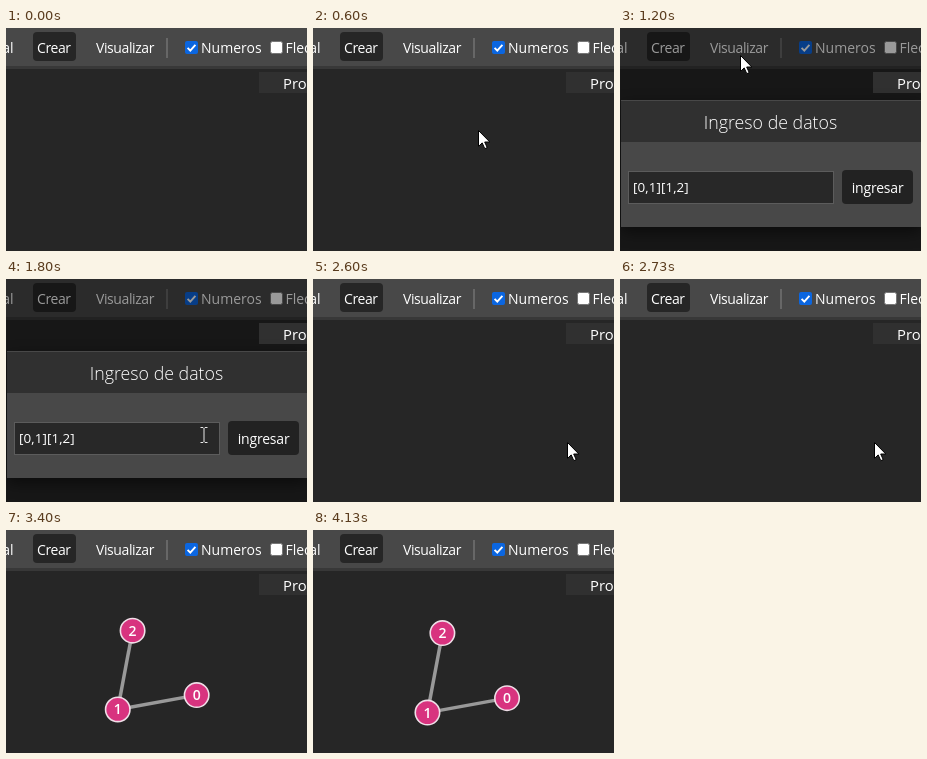
An HTML page for the animation above (4190 ms loop, 301 px wide and 223 px high).

```html
<!DOCTYPE html>
<html lang="es">
<head>
<meta charset="utf-8">
<title>Editor de grafos</title>
<style>
  html, body { margin: 0; width: 100%; height: 100%; overflow: hidden; background: #262626; }
  svg { display: block; width: 100%; height: 100%; }
  text { font: 14px "Open Sans", "Noto Sans", sans-serif; fill: #fff; }
  .btn { fill: #262626; }
  .tight { letter-spacing: -.4px; }
  .mid { text-anchor: middle; }
  .title { font-size: 17.8px; font-weight: 300; }
  .tab { font-size: 14.8px; }
  .field { font-size: 13.4px; letter-spacing: .1px; }
  #edges line { stroke: #999; stroke-width: 3.5; }
  #nodes circle { fill: #d8337f; stroke: #f0dfe8; stroke-width: 1.6; }
  #nodes text { font-weight: 600; }
</style>
</head>
<body>
<svg viewBox="0 0 301 223" preserveAspectRatio="none">
  <defs>
    <filter id="blur" x="-20%" y="-30%" width="140%" height="160%"><feGaussianBlur stdDeviation="7.5"/></filter>
  </defs>
  <rect width="301" height="223" fill="#262626"/>

  <g id="graph"><g id="edges"></g><g id="nodes"></g></g>

  <rect width="301" height="38" fill="#484848"/>
  <rect y="38" width="301" height="3" fill="#383838"/>
  <text x="7.5" y="25" text-anchor="end">Manual</text>
  <rect class="btn" x="27" y="4" width="43" height="29" rx="4"/>
  <text class="tight" x="31" y="25">Crear</text>
  <rect class="btn" id="hover" x="86" y="4" width="66" height="29" rx="4"/>
  <text class="tight" x="90" y="25">Visualizar</text>
  <rect x="160" y="10" width="2" height="20" fill="#676767"/>
  <rect x="179" y="13" width="13" height="13" rx="2" fill="#0b66e0"/>
  <path d="M181.6 19.8l2.7 2.8 5.1-5.7" fill="none" stroke="#fff" stroke-width="1.9"/>
  <text x="195" y="25">Numeros</text>
  <rect x="264.5" y="13.5" width="12" height="12" rx="2" fill="#fff" stroke="#767676"/>
  <text x="279.5" y="25">Flechas</text>

  <rect id="shade" width="301" height="223" fill="#000" opacity=".4"/>
  <rect x="253" y="44" width="48" height="21" fill="#303030"/>
  <text class="tab" x="277" y="61">Propiedades</text>

  <g id="dialog">
    <rect x="1" y="77" width="300" height="127" fill="#000" opacity=".5" filter="url(#blur)"/>
    <rect x="1" y="72" width="300" height="127" fill="#484848"/>
    <rect x="1" y="73" width="300" height="41" fill="#303030"/>
    <text class="mid title" x="150.5" y="101">Ingreso de datos</text>
    <rect x="8.5" y="143.5" width="205" height="32" fill="#282828" stroke="#5c5c5c"/>
    <text class="field" x="13" y="164">[0,1][1,2]</text>
    <rect x="222" y="142" width="71" height="34" rx="4" fill="#222"/>
    <text class="mid" x="257.6" y="165" letter-spacing="-.2">ingresar</text>
  </g>

  <g id="arrow">
    <path d="M.5 .5V16.4L4.2 12.9 6.8 18.7 9.2 17.6 6.7 12H11.8Z" fill="#fff" stroke="#000" stroke-width="1"/>
  </g>
  <g id="beam" fill="none">
    <path d="M-3.5 -7.5H-1L0 -6.5 1 -7.5H3.5M0 -6.5V6.5M-3.5 7.5H-1L0 6.5 1 7.5H3.5" stroke="#e8e8e8"/>
  </g>
</svg>
<script>
  const LOOP = 4190, STEP = 200 / 3;
  const OPEN = 18, CLOSE = 39, GRAPH = 42;
  const $ = id => document.getElementById(id);

  // Pointer stops: step, x, y
  const stops = [
    [4, 255, 211], [5, 248, 198], [7, 214, 156], [9, 165, 102], [11, 127, 57],
    [12, 121, 38], [13, 120, 27], [21, 120, 27],
    [22, 123, 34], [23, 134, 56], [25, 168, 113], [26, 184, 138], [27, 198, 156],
    [28, 208, 163], [29, 217, 167], [30, 228, 173], [31, 240, 175], [32, 250, 170],
    [33, 254, 163], [41, 254, 163], [43, 290, 169]
  ];

  // Offsets of the nodes 0, 1, 2 from their centre
  const shape = [[48.2, 16.9], [-31.6, 31.4], [-16.6, -48.3]];
  const links = [[0, 1], [1, 2]];

  function add(parent, tag, attrs = {}) {
    const el = document.createElementNS("http://www.w3.org/2000/svg", tag);
    set(el, attrs);
    return parent.appendChild(el);
  }
  function set(el, attrs) {
    for (const k in attrs) el.setAttribute(k, attrs[k]);
  }
  function show(el, on) {
    el.style.display = on ? "" : "none";
  }

  const lines = links.map(() => add($("edges"), "line"));
  const balls = shape.map((_, i) => {
    const g = add($("nodes"), "g");
    add(g, "circle", { r: 12.2 });
    add(g, "text", { class: "mid", y: 5 }).textContent = i;
    return g;
  });

  function pointer(n) {
    const last = stops.length - 1;
    if (n < stops[0][0] || n > stops[last][0]) return null;
    const i = Math.min(last - 1, stops.findLastIndex(s => s[0] <= n));
    const [a, ax, ay] = stops[i], [b, bx, by] = stops[i + 1];
    const k = (n - a) / (b - a);
    return [ax + (bx - ax) * k, ay + (by - ay) * k];
  }

  // The graph spreads out while it settles towards its resting centre
  function layout(n) {
    const u = n * STEP - 3000;
    const slow = Math.exp(-u / 500);
    const gap = 19.6 * Math.exp(-u / 130) + 6 * slow;
    const size = (1 - 0.025 * slow) * (1 - Math.exp(-(u + 260) / 60));
    const cx = 146.6 - gap, cy = 151.9 - gap * 0.97;
    return shape.map(([x, y]) => [cx + x * size, cy + y * size]);
  }

  function draw(t) {
    const n = Math.floor((t + 3.4) / STEP);
    const open = n >= OPEN && n < CLOSE;
    const p = pointer(n);
    const inField = open && p && p[0] > 8 && p[0] < 214 && p[1] > 143 && p[1] < 176;

    show($("shade"), open);
    show($("dialog"), open);
    show($("hover"), !open && p && p[1] < 39 && p[0] > 86 && p[0] < 152);
    show($("arrow"), p && !inField);
    show($("beam"), inField);
    if (p) {
      const move = { transform: `translate(${Math.round(p[0])} ${Math.round(p[1])})` };
      set($("arrow"), move);
      set($("beam"), move);
    }

    show($("graph"), n >= GRAPH);
    if (n < GRAPH) return;
    const pts = layout(n);
    balls.forEach((b, i) => set(b, { transform: `translate(${pts[i]})` }));
    lines.forEach((l, i) => {
      const [a, b] = links[i].map(k => pts[k]);
      set(l, { x1: a[0], y1: a[1], x2: b[0], y2: b[1] });
    });
  }

  const start = performance.now();
  function tick() {
    draw((performance.now() - start) % LOOP);
    requestAnimationFrame(tick);
  }
  tick();
</script>
</body>
</html>
```
